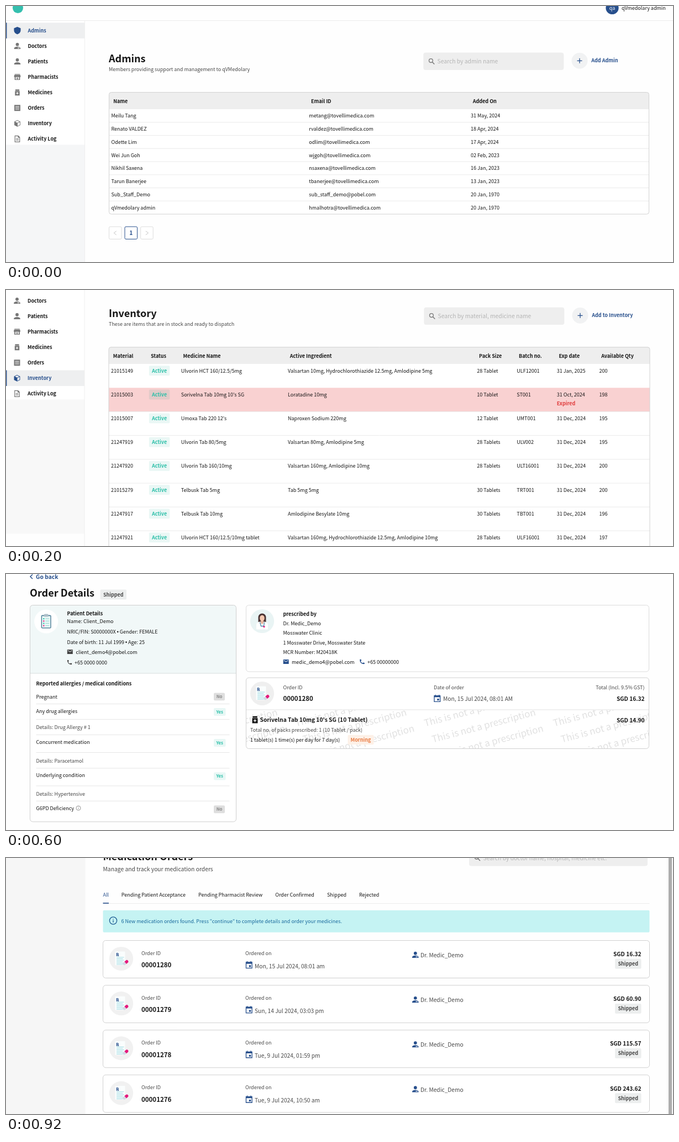
An HTML page with a canvas for the animation above (1 s loop, 1207 by 464 pixels).

```html
<!DOCTYPE html>
<html lang="en">
<head>
<meta charset="utf-8">
<title>Pharmacy portal tour</title>
<style>
html, body { margin: 0; width: 100%; height: 100%; overflow: hidden; background: #fff; }
canvas { display: block; width: 1207px; height: 464px; }
</style>
</head>
<body>
<canvas id="stage"></canvas>
<script>
const W = 1207, H = 464, HOLD = 200;
const cv = document.getElementById('stage');
const dpr = window.devicePixelRatio || 1;
cv.width = W * dpr;
cv.height = H * dpr;
const c = cv.getContext('2d');

// The Korean face keeps curly quotes proportional
const FONT = '"Noto Sans CJK KR", "Noto Sans CJK SC", "Noto Sans CJK JP", "Noto Sans", sans-serif';
const NAVY = '#274f8c', INK = '#151515', GREY = '#484848', TEAL = '#2bbfa8';
const BRAND = 'qVMedolary', USER = 'qVmedolary admin', DOCTOR = 'Dr. Medic_Demo';

// Icons on a 24 x 24 grid, filled even-odd
const PERSON = 'M12 2.5a4.8 4.8 0 110 9.6 4.8 4.8 0 010-9.6zM2.5 21v-2c0-6.5 19-6.5 19 0v2z';
const ICONS = {
  shield: 'M12 1L2 5v6c0 6 4 10 10 12 6-2 10-6 10-12V5z',
  person: PERSON,
  doctor: PERSON + 'M13 17h5.5v2H13z',
  shop: 'M4 3h16v2H4zM3 6h18l1 6h-2v9H4v-9H2zM7 12v7h10v-7zM11 13h2v2h2v2h-2v2h-2v-2H9v-2h2z',
  bottle: 'M6 3h12v4H6zM5 8h14v13H5zM11 11h2v2.5h2.5v2H13V18h-2v-2.5H8.5v-2H11z',
  list: 'M3 3h18v18H3zM6 7v1.5h12V7zM6 11v1.5h12V11zM6 15v1.5h12V15z',
  cube: 'M12 2l9 4.5v11L12 22l-9-4.5v-11zM12.8 11.5v8.4l6.7-3.4V8zM12 3.8L5.5 7 12 10.2 18.5 7z',
  log: 'M4 2h11l5 5v15H4zM6 4v16h12V8.5h-4.5V4zM8 11h8v2H8zM8 15h8v2H8z',
  mail: 'M2 4h20v16H2zM4 6v2l8 5 8-5V6l-8 5z',
  phone: 'M4 3h4l1 5-2.4 2.8q2.2 4.4 6.6 6.6L16 15l5 1v4q-1 1-2 1Q3 20 3 4z',
  date: 'M3 3h3V1h2v2h8V1h2v2h3v18H3zM5 8v11h14V8zM12 12h5v5h-5z'
};
for (const k in ICONS) ICONS[k] = new Path2D(ICONS[k]);

function box(x, y, w, h, fill, r = 0, stroke) {
  c.beginPath();
  c.roundRect(x, y, w, h, r);
  if (fill) { c.fillStyle = fill; c.fill(); }
  if (stroke) { c.strokeStyle = stroke; c.lineWidth = 1; c.stroke(); }
}

function disc(x, y, r, fill) {
  c.beginPath();
  c.arc(x, y, r, 0, 7);
  c.fillStyle = fill;
  c.fill();
}

function line(color, width, ...p) {
  c.beginPath();
  for (let i = 0; i < p.length; i += 2) c.lineTo(p[i], p[i + 1]);
  c.strokeStyle = color;
  c.lineWidth = width;
  c.stroke();
}

// y is the middle of the capitals
function text(s, x, y, color = INK, size = 9, weight = 400, align = 'left') {
  c.font = `${weight} ${size}px ${FONT}`;
  c.textAlign = align;
  c.fillStyle = color;
  c.fillText(s, x, y + size * 0.367);
}

const bold = (s, x, y, color = INK, size = 9, align) => text(s, x, y, color, size, 600, align);

// Two texts with a narrow bullet between them
function pair(a, b, x, y) {
  text(a, x, y);
  const end = x + c.measureText(a).width;
  disc(end + 3.5, y + 0.3, 1.3, INK);
  text(b, end + 7, y);
}

function icon(name, x, y, size, color) {
  c.save();
  c.translate(x - size / 2, y - size / 2);
  c.scale(size / 24, size / 24);
  c.fillStyle = color;
  c.fill(ICONS[name], 'evenodd');
  c.restore();
}

function tag(s, x, y, w, h, fill, color, size = 9) {
  box(x, y, w, h, fill, 2);
  bold(s, x + w / 2, y + h / 2, color, size, 'center');
}

const shipped = (x, y) => tag('Shipped', x, y, 47.5, 18, '#eceeee', GREY);

function info(x, y, r, color, width) {
  c.beginPath();
  c.arc(x, y, r, 0, 7);
  c.strokeStyle = color;
  c.lineWidth = width;
  c.stroke();
  line(color, width, x, y - r * 0.1, x, y + r * 0.5);
  line(color, width, x, y - r * 0.5, x, y - r * 0.3);
}

const MENU = [['shield', 'Admins'], ['doctor', 'Doctors'], ['person', 'Patients'], ['shop', 'Pharmacists'],
  ['bottle', 'Medicines'], ['list', 'Orders'], ['cube', 'Inventory'], ['log', 'Activity Log']];

function sidebar(x, y, sel, under) {
  const pitch = 28.05, right = x + 103;
  box(0, y - 14, right, H, under);
  box(0, y - 18, right, 225, '#fff');
  line('#eeeeee', 1, right, y - 18, right, H);
  MENU.forEach(([ic, label], i) => {
    const cy = y + i * pitch, on = label === sel;
    if (on) {
      box(0, cy - 14.2, right, 28.4, '#eeeff0');
      box(0, cy - 14.2, 1.4, 28.4, NAVY);
    }
    icon(ic, x - 19, cy, 14.5, on ? NAVY : '#777');
    bold(label, x, cy, on ? NAVY : INK);
  });
}

function header(y) {
  disc(21.5, y, 9.5, '#35bfae');
  disc(1097, y, 11.6, NAVY);
  text('qa', 1097, y, '#fff', 9, 500, 'center');
  text(USER, 1114, y - 0.2);
  line('#ebebeb', 1, 0, y + 23, W, y + 23);
}

function lens(x, y) {
  c.beginPath();
  c.arc(x - 1.4, y - 1.4, 3.4, 0, 7);
  c.strokeStyle = '#777';
  c.lineWidth = 1.3;
  c.stroke();
  line('#777', 1.5, x + 1.2, y + 1.2, x + 5, y + 5);
}

// x: left edge, sx: left edge of search, y: middle of title
function heading(x, sx, y, title, sub, hint, add) {
  text(title, x, y, INK, 18, 700);
  text(sub, x, y + 18.8, GREY);
  box(sx, y - 11.3, 254, 31.6, '#eeeeee', 4);
  lens(sx + 15, y + 4.8);
  text(hint, sx + 25.3, y + 5, '#b4b4b4', 10.3);
  const px = sx + 282.7, py = y + 3.6;
  disc(px, py, 14.5, '#f1f2f3');
  line(NAVY, 1.3, px - 4.5, py, px + 4.5, py);
  line(NAVY, 1.3, px, py - 4.5, px, py + 4.5);
  bold(add, sx + 304, y + 3.2, NAVY);
}

// Every cell starts a little left of its column head
function table(x, y, right, pitch, heads, cols, rows, alarm) {
  const top = y + 30.5, end = top + rows.length * pitch;
  box(x, y, right - x, end - y, '#fff', 4);
  box(x, y, right - x, 30.5, '#eeeeee', [4, 4, 0, 0]);
  heads.forEach((s, i) => bold(s, cols[i], y + 16));
  rows.forEach((row, r) => {
    const ty = top + r * pitch, cy = ty + 12.1;
    if (r === alarm) box(x, ty, right - x, pitch, '#f9d1d1');
    else if (r) line('#ebebeb', 1, x, ty, right, ty);
    row.forEach((s, i) => {
      const cx = cols[i] - 3.7;
      if (s === 'Active') tag(s, cx + 0.5, cy - 9, 37.5, 18, r === alarm ? '#e2cac8' : '#eaf7f5', TEAL);
      else text(s, cx, cy);
    });
    if (r === alarm) bold('Expired', cols[6] - 3.7, cy + 16, '#e03c3c');
  });
  box(x, y, right - x, end - y, null, 4, '#d2d2d2');
}

function pager(x, y) {
  [0, 28.5, 57.2].forEach((dx, i) => {
    box(x + dx, y, 22.5, 22.5, '#fff', 2, i === 1 ? NAVY : '#dcdcdc');
    const mx = x + dx + 11.2, my = y + 11.4, k = i - 1;
    if (k) line('#c4c4c4', 1, mx - 2 * k, my - 3.5, mx + 2.5 * k, my, mx - 2 * k, my + 3.5);
    else bold('1', mx, my, NAVY, 10.3, 'center');
  });
}

function script(x, y, fill) {
  disc(x, y, 21.6, fill);
  box(x - 11, y - 13, 18, 25, '#fafdfd', 1);
  bold('℞', x - 9.5, y - 7, NAVY, 8);
  for (let i = 0; i < 6; i++) line('#9fdce4', 1, x - 8.5, y - 2.5 + i * 2.6, x + (i % 2 ? 3 : 5), y - 2.5 + i * 2.6);
  c.save();
  c.translate(x + 8, y + 7);
  c.rotate(-0.7);
  box(-6, -2.7, 6, 5.4, '#d4d8e4', [2.7, 0, 0, 2.7]);
  box(-0.5, -2.7, 6, 5.4, '#e5187d', [0, 2.7, 2.7, 0]);
  c.restore();
}

function clipboard(x, y) {
  disc(x, y, 21.6, '#fff');
  box(x - 9, y - 11.5, 18, 24, '#4a7c96', 2);
  box(x - 7.6, y - 9.8, 15.2, 20.9, '#eaf7f6');
  box(x - 4, y - 13.5, 8, 5, '#aebfc9', 1.5);
  for (let i = 0; i < 4; i++) {
    const ly = y - 5 + i * 4.2;
    box(x - 5.5, ly - 1, 2.2, 2.2, i % 2 ? '#e5187d' : TEAL);
    line('#8fd5d0', 1, x - 1.5, ly, x + 5.5, ly);
  }
}

function medic(x, y) {
  disc(x, y, 21.6, '#e9f4f4');
  box(x - 7, y - 14, 14, 20, '#4a3434', [7, 7, 4, 4]);
  box(x - 10.5, y + 1, 21, 14, '#fff', [6, 6, 1, 1]);
  box(x - 2.5, y - 2, 5, 7, '#e8b49c', 2);
  c.beginPath();
  c.ellipse(x, y - 5.5, 4.3, 5.6, 0, 0, 7);
  c.fillStyle = '#f4c8b0';
  c.fill();
  line('#4f86a8', 1.3, x - 4, y + 2, x - 2, y + 9, x + 3, y + 9, x + 4, y + 2);
  disc(x + 3.5, y + 10, 1.6, '#e5187d');
}

function admins() {
  sidebar(39.5, 44.5, 'Admins', '#f5f6f7');
  header(3.5);
  heading(186, 755.3, 95.7, 'Admins', 'Members providing support and management to ' + BRAND, 'Search by admin name', 'Add Admin');
  const people = [
    ['Meilu Tang', 'metang', '31 May, 2024'], ['Renato VALDEZ', 'rvaldez', '18 Apr, 2024'],
    ['Odette Lim', 'odlim', '17 Apr, 2024'], ['Wei Jun Goh', 'wjgoh', '02 Feb, 2023'],
    ['Nikhil Saxena', 'nsaxena', '16 Jan, 2023'], ['Tarun Banerjee', 'tbanerjee', '13 Jan, 2023'],
    ['Sub_Staff_Demo', 'sub_staff_demo@pobel.com', '20 Jan, 1970'], [USER, 'hmalhotra', '20 Jan, 1970']
  ].map(([n, m, d]) => [n, m.includes('@') ? m : m + '@tovellimedica.com', d]);
  table(186.5, 156.5, 1163.5, 23.77, ['Name', 'Email ID', 'Added On'], [194.2, 552, 844.7], people);
  pager(186.5, 400);
}

const HCT = (a) => `Valsartan ${a}mg, Hydrochlorothiazide 12.5mg, Amlodipine ${a === 10 ? 5 : 10}mg`;
const DRUGS = {
  21015149: ['Ulvorin HCT 160/12.5/5mg', HCT(10)],
  21015003: ["Sorivelna Tab 10mg 10's SG", 'Loratadine 10mg'],
  21015007: ["Umoxa Tab 220 12's", 'Naproxen Sodium 220mg'],
  21247919: ['Ulvorin Tab 80/5mg', 'Valsartan 80mg, Amlodipine 5mg'],
  21247920: ['Ulvorin Tab 160/10mg', 'Valsartan 160mg, Amlodipine 10mg'],
  21015279: ['Telbusk Tab 5mg', 'Tab 5mg 5mg'],
  21247917: ['Telbusk Tab 10mg', 'Amlodipine Besylate 10mg'],
  21247921: ['Ulvorin HCT 160/12.5/10mg tablet', HCT(160)]
};
const drugRow = ([id, ...rest]) => [id, 'Active', ...DRUGS[id], ...rest];
const DRUG_HEADS = ['Material', 'Status', 'Medicine Name', 'Active Ingredient', 'Pack Size'];

function inventory() {
  sidebar(39, -8.5, 'Inventory', '#f8f8f8');
  heading(186, 756.3, 42.7, 'Inventory', 'These are items that are in stock and ready to dispatch', 'Search by material, medicine name', 'Add to Inventory');
  const stock = [
    ['21015149', '28 Tablet', 'ULF12001', '31 Jan, 2025', '200'],
    ['21015003', '10 Tablet', 'ST001', '31 Oct, 2024', '198'],
    ['21015007', '12 Tablet', 'UMT001', '31 Dec, 2024', '195'],
    ['21247919', '28 Tablets', 'ULV002', '31 Dec, 2024', '195'],
    ['21247920', '28 Tablets', 'ULT16001', '31 Dec, 2024', '200'],
    ['21015279', '30 Tablets', 'TRT001', '31 Dec, 2024', '200'],
    ['21247917', '30 Tablets', 'TBT001', '31 Dec, 2024', '196'],
    ['21247921', '28 Tablets', 'ULF16001', '31 Dec, 2024', '197']
  ].map(drugRow);
  table(186, 103.6, 1165, 43.2, [...DRUG_HEADS, 'Batch no.', 'Exp date', 'Available Qty'],
    [193.8, 262, 320.5, 513.7, 856, 928, 1000.4, 1077.2], stock, 1);
}

function medicines() {
  sidebar(40, 65, 'Medicines', '#f8f8f8');
  header(24);
  box(0, 0, W, 1, '#666');
  heading(187, 755.5, 94.5, 'Medicines', 'These medicines are available on ' + BRAND, 'Search by ingredient, medicine name', 'Add Medicines');
  const prices = [
    ['21015003', '10 Tablet', '14.00', '14.90'], ['21015007', '12 Tablet', '9.20', '9.80'],
    ['21015149', '28 Tablet', '63.45', '76.14'], ['21247917', '30 tablets', '87.60', '105.12'],
    ['21247920', '28 tablets', '63.45', '76.14'], ['21015279', '30 tablets', '0.00', '200.00'],
    ['21247919', '28 tablets', '46.35', '55.62'], ['21247921', '28 tablets', '63.45', '76.14']
  ].map(([id, pack, cost, sell]) => drugRow([id, pack, 'SGD ' + cost, 'SGD ' + sell]));
  table(187, 155.5, 1163.5, 23.7, [...DRUG_HEADS, 'Cost Price', 'Selling Price'],
    [194.7, 292, 370.2, 536, 828.7, 946, 1043.8], prices);
  pager(187.3, 398.3);
}

function patientCard() {
  box(43.5, 56.5, 373, 392.5, '#fff', 5);
  box(43.5, 56.5, 373, 123.5, '#f1f8f8', [5, 5, 0, 0]);
  line('#d8dddd', 1, 43.5, 180, 416.5, 180);
  box(43.5, 56.5, 373, 392.5, null, 5, '#cfcfcf');
  clipboard(72.7, 86);
  bold('Patient Details', 110.5, 71.5);
  text('Name: Client_Demo', 110.5, 86);
  pair('NRIC/FIN: S0000000X', 'Gender: FEMALE', 110.5, 104.5);
  pair('Date of birth: 11 Jul 1999', 'Age: 25', 110.5, 123.3);
  icon('mail', 115.8, 141, 12, '#444');
  text('client_demo4@pobel.com', 126.5, 142);
  icon('phone', 115, 160, 11, '#444');
  text('+65 0000 0000', 124, 160.5);

  bold('Reported allergies / medical conditions', 54.5, 198.7);
  [235.5, 263.5, 291.5, 323.5, 352, 384, 411.5].forEach(y => line('#e6e6e6', 1, 54.5, y, 404.5, y));
  [['Pregnant', 222.5, 0], ['Any drug allergies', 248.5, 1], ['Concurrent medication', 304.5, 1],
    ['Underlying condition', 365, 1], ['G6PD Deficiency', 425, 0]].forEach(([s, y, yes], i) => {
    text(s, 54.5, y);
    const by = y - 7 + (i ? 1.6 : 0);
    if (yes) tag('Yes', 376, by, 21.5, 13.8, '#e8f7f5', TEAL, 7.8);
    else tag('No', 376, by, 20, 13.8, '#dedede', '#888', 7.8);
  });
  text('Details: Drug Allergy # 1', 54.5, 278, GREY);
  text('Details: Paracetamol', 54.5, 338.3, GREY);
  text('Details: Hypertensive', 54.5, 398.7, GREY);
  info(131, 424.3, 4, '#777', 0.8);
}

function stamps() {
  c.save();
  c.beginPath();
  c.rect(435, 246.5, 728, 69.5);
  c.clip();
  for (let col = -2; col < 3; col++) for (let row = 0; row < 3; row++) {
    c.save();
    c.translate(758.5 + col * 233.5 + row * 14, 276.5 + row * 29.3);
    c.rotate(-0.262);
    text('This is not a prescription', 0, -6.2, '#e1e1e1', 17);
    c.restore();
  }
  c.restore();
}

function details() {
  line(NAVY, 1.5, 48, 0.8, 44, 4.8, 48, 8.8);
  bold('Go back', 54, 5, NAVY, 10.3);
  text('Order Details', 43, 34.8, INK, 18.1, 700);
  shipped(170.5, 28.3);
  patientCard();

  box(434.5, 56.5, 729, 120.5, '#fff', 5, '#dcdcdc');
  medic(463.5, 85.5);
  bold('prescribed by', 501.5, 72.3);
  text(DOCTOR, 501.5, 89.7);
  text('Mosswater Clinic', 501.5, 107);
  text('1 Mosswater Drive, Mosswater State', 501.5, 124.3);
  text('MCR Number: M20418K', 501.5, 141.5);
  icon('mail', 506.7, 159, 12, NAVY);
  text('medic_demo4@pobel.com', 517, 160);
  icon('phone', 644.5, 159, 11.5, NAVY);
  text('+65 00000000', 654, 160);

  box(434.5, 188, 729, 128.5, '#fff', 5);
  stamps();
  line('#e2e2e2', 1, 434.5, 246, 1163.5, 246);
  box(434.5, 188, 729, 128.5, null, 5, '#d0d0d0');
  script(463.5, 216.5, '#efefef');
  text('Order ID', 501.5, 206, GREY);
  bold('00001280', 501.5, 226.2, INK, 11.5);
  text('Date of order', 774, 206, GREY);
  icon('date', 780.3, 226, 16, NAVY);
  text('Mon, 15 Jul 2024, 08:01 AM', 791, 226.5, GREY, 10.2);
  text('Total (Incl. 9.5% GST)', 1155.5, 206, GREY, 9, 400, 'right');
  bold('SGD 16.32', 1155.5, 226.5, INK, 10.2, 'right');
  bold('SGD 14.90', 1155.5, 265.3, INK, 10.2, 'right');
  icon('bottle', 450.5, 264, 17, INK);
  bold("Sorivelna Tab 10mg 10's SG (10 Tablet)", 459.5, 264.5, INK, 10.3);
  text('Total no. of packs prescribed: 1 (10 Tablet / pack)', 442, 282.3, GREY);
  text('1 tablet(s) 1 time(s) per day for 7 day(s)', 442, 300.8);
  tag('Morning', 618.5, 291.8, 47, 17.5, '#fdf1e8', '#ea7b42');
}

function orders() {
  box(0, 0, 143.5, H, '#f6f6f6');
  text('Medication Orders', 175.5, -3, INK, 18, 700);
  text('Manage and track your medication orders', 175.5, 20, GREY, 10.3);
  box(838, -17, 323, 31.5, '#eeeeee', 4);
  lens(853, 0);
  text('Search by doctor name, hospital, medicine etc.', 863.5, 0, '#b4b4b4', 10.3);

  line('#ececec', 1, 175.5, 82.5, 1164.5, 82.5);
  box(175.5, 81, 10.5, 1.6, NAVY);
  [['All', 175.5], ['Pending Patient Acceptance', 208.7], ['Pending Pharmacist Review', 348], ['Order Confirmed', 487.3],
    ['Shipped', 581], ['Rejected', 639]].forEach(([s, x], i) => text(s, x, 67, i ? INK : NAVY));

  box(175.5, 94.7, 989, 40, '#c5f3f3', 2);
  info(194, 113.5, 6.6, '#1c5a92', 1.3);
  text('6 New medication orders found. Press “continue” to complete details and order your medicines.', 208.5, 114.2, '#17689c');

  [['80', 'Mon, 15 Jul 2024, 08:01 am', '16.32'], ['79', 'Sun, 14 Jul 2024, 03:03 pm', '60.90'],
    ['78', 'Tue, 9 Jul 2024, 01:59 pm', '115.57'], ['76', 'Tue, 9 Jul 2024, 10:50 am', '243.62']].forEach(([id, when, sum], i) => {
    const y = 149.5 + i * 81.2;
    box(175.5, y, 989, 68, '#fff', 5, '#d0d0d0');
    script(208.5, y + 33, '#f1f1f1');
    text('Order ID', 245, y + 23, GREY);
    bold('000012' + id, 245, y + 44.5, INK, 11.5);
    text('Ordered on', 433, y + 23, GREY);
    icon('date', 439.8, y + 44.8, 16, NAVY);
    text(when, 450, y + 46.5, GREY, 10.2);
    icon('doctor', 740.8, y + 26, 14.5, NAVY);
    text(DOCTOR, 750, y + 26.8, GREY, 10.2);
    bold('SGD ' + sum, 1149.5, y + 24.8, INK, 10.2, 'right');
    shipped(1102, y + 33.2);
  });

  box(1196, 0, 11, H, '#f7f7f7');
  box(1199, 0, 6, H, '#adadad');
}

const scenes = [admins, inventory, medicines, details, orders];
let shown = -1;

function tick() {
  const n = Math.floor(performance.now() / HOLD) % scenes.length;
  if (n !== shown) {
    shown = n;
    c.setTransform(dpr, 0, 0, dpr, 0, 0);
    box(0, 0, W, H, '#fefefe');
    scenes[n]();
  }
  requestAnimationFrame(tick);
}
tick();
</script>
</body>
</html>
```
